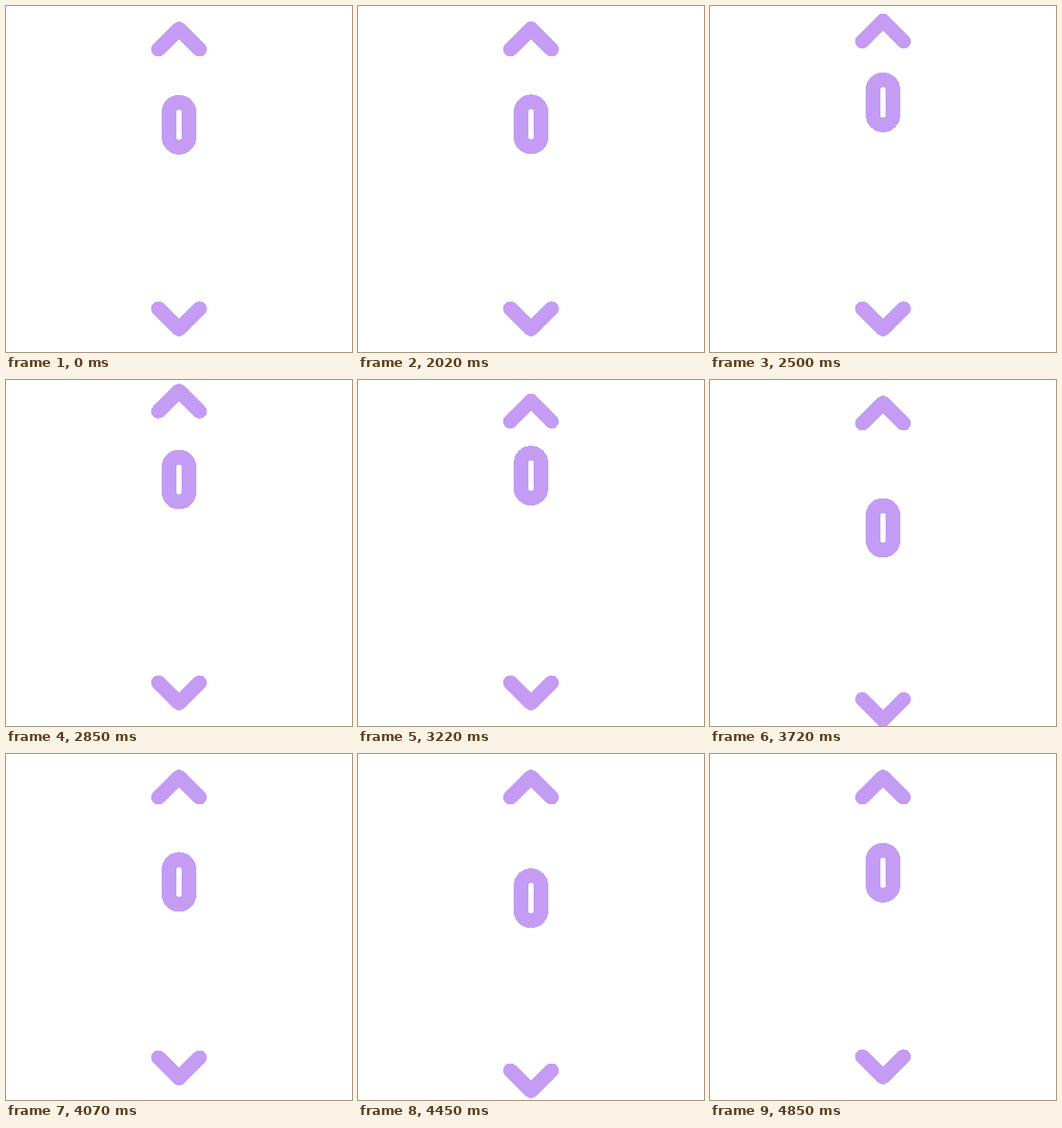
Recreate the animation shown at these times as an HTML page. Size 400x400 px, loop 4870 ms.

```html
<!DOCTYPE html>
<html lang="en">
<head>
<meta charset="utf-8">
<title>Scroll indicator</title>
<style>
  html, body { margin: 0; width: 100%; height: 100%; overflow: hidden; background: #fff; }
  svg { display: block; width: 100%; height: 100%; }
</style>
</head>
<body>
<svg viewBox="0 0 400 400" fill="none" stroke="#c49cf4" stroke-width="16.7"
     stroke-linecap="round" stroke-linejoin="round" shape-rendering="crispEdges">
  <path id="up" d="M176.2 50.2 L200 26.4 L223.8 50.2"/>
  <path id="down" d="M176.2 349.8 L200 373.6 L223.8 349.8"/>
  <rect id="wheel" x="188.5" y="111.3" width="23" height="52" rx="11.5" stroke-width="17"/>
</svg>
<script>
const LOOP = 4870, START = 2000, END = 4850;
const BEAT = 332;          // one rise or one fall
const LAG = 20;            // the wheel trails the arrows
const LAST_PEAK = 7;       // in beats; the first four go up, the rest down
const ARROW_REACH = 20, WHEEL_REACH = 34, WHEEL_DIP = 10;

// CSS-style cubic bezier with y1 = 0 and y2 = 1, solved by bisection.
const bezier = (x1, x2) => x => {
  let lo = 0, hi = 1;
  for (let i = 0; i < 24; i++) {
    const t = (lo + hi) / 2, s = 1 - t;
    if (3 * x1 * t * s * s + 3 * x2 * t * t * s + t * t * t < x) lo = t;
    else hi = t;
  }
  return lo * lo * (3 - 2 * lo);
};

const snap = bezier(0.7, 0.3);
const launch = bezier(0.3, 0.3);
const settle = bezier(0.45, 0.12);

// 0 on even beats, 1 on odd beats.
const bounce = beat => snap(1 - Math.abs(1 - beat % 2));

// 1 at the last peak, easing to 0 at the end.
function release(time, lag) {
  const peak = START + lag + LAST_PEAK * BEAT;
  return 1 - settle((time - peak) / (END - peak));
}

function arrowOffset(time) {
  const beat = (time - START) / BEAT;
  const level = beat < LAST_PEAK ? bounce(beat) : release(time, 0);
  return Math.sign(beat - 4) * ARROW_REACH * level;
}

function wheelOffset(time) {
  const beat = (time - START - LAG) / BEAT;
  if (beat < 1) return -WHEEL_REACH * launch((time - START) / (BEAT + LAG));
  if (beat > LAST_PEAK) return WHEEL_REACH * release(time, LAG);
  if (beat > 3 && beat < 5) return WHEEL_REACH * (2 * snap((beat - 3) / 2) - 1);
  return Math.sign(beat - 4) * (WHEEL_DIP + (WHEEL_REACH - WHEEL_DIP) * bounce(beat));
}

const shift = (id, y) =>
  document.getElementById(id).setAttribute("transform", `translate(0 ${y.toFixed(3)})`);

function render(time) {
  const moving = time > START && time < END;
  const arrow = moving ? arrowOffset(time) : 0;
  shift("up", Math.min(arrow, 0));
  shift("down", Math.max(arrow, 0));
  shift("wheel", moving ? wheelOffset(time) : 0);
}

const begin = performance.now();
function tick() {
  render((performance.now() - begin) % LOOP);
  requestAnimationFrame(tick);
}
tick();
</script>
</body>
</html>
```
